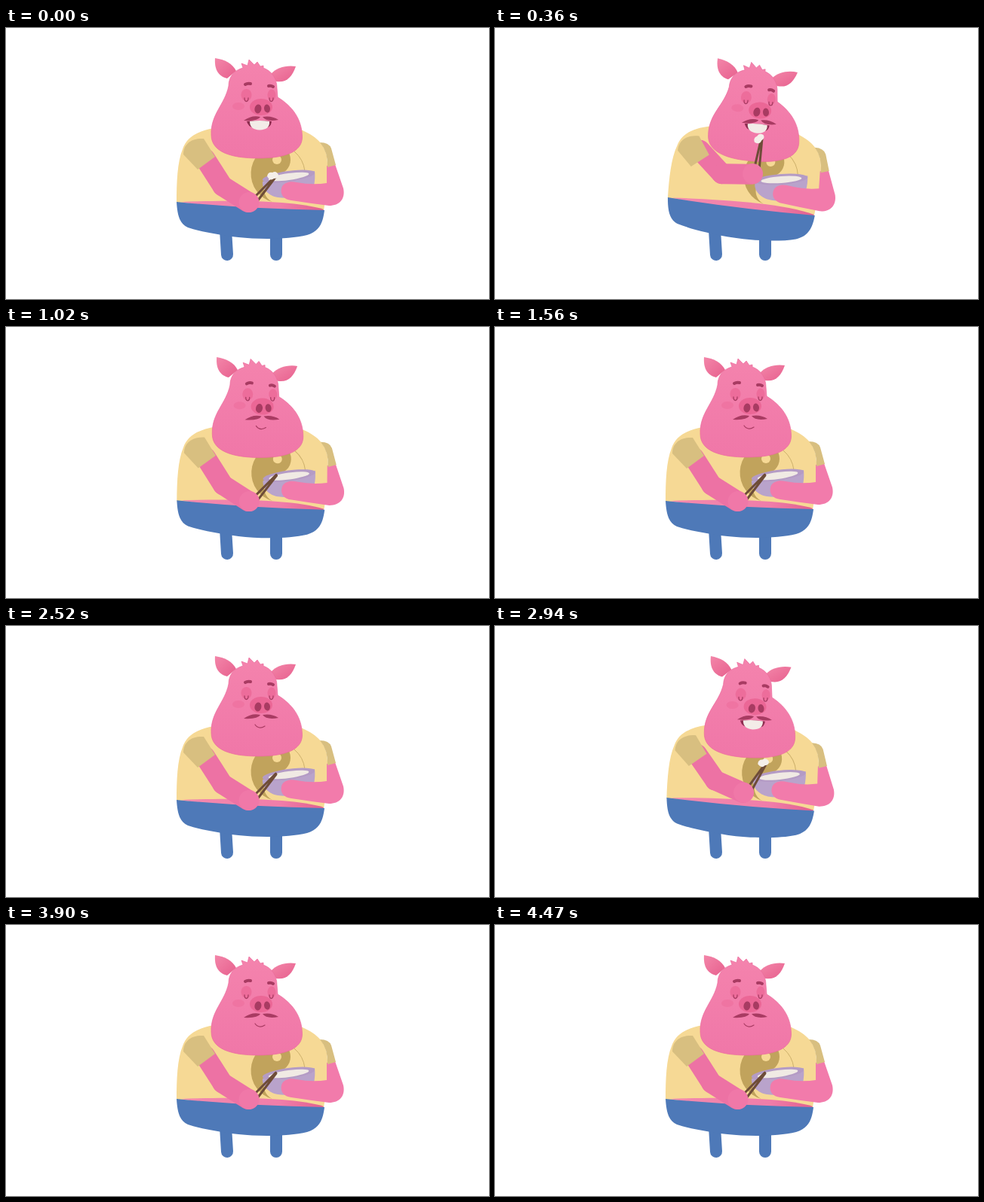
An HTML page for the animation above (4.5 s loop, 640 by 360 pixels).

```html
<!DOCTYPE html>
<html lang="en">
<head>
<meta charset="utf-8">
<title>Pig eating rice</title>
<style>
  html, body { margin: 0; width: 100%; height: 100%; overflow: hidden; background: #fff; }
  svg { display: block; width: 100vw; height: 100vh; }
  .line { fill: none; stroke-linecap: round; stroke-linejoin: round; }
</style>
</head>
<body>
<svg viewBox="0 0 640 360">
  <defs>
    <linearGradient id="skin" x1="0" y1="0" x2="0" y2="1">
      <stop offset="0" stop-color="#f483ad"/><stop offset="1" stop-color="#f077a8"/>
    </linearGradient>
    <linearGradient id="ear" x1="0" y1="0" x2="1" y2="1">
      <stop offset="0" stop-color="#f386a9"/><stop offset="1" stop-color="#e7608e"/>
    </linearGradient>
    <linearGradient id="belly">
      <stop offset="0" stop-color="#f38aae"/><stop offset=".7" stop-color="#f07da9"/><stop offset="1" stop-color="#e2608f"/>
    </linearGradient>
  </defs>

  <g class="line" stroke="#4e79b8" stroke-width="16">
    <path d="M291 268L293 301M358 268V301"/>
  </g>

  <g class="torso">
    <path fill="#f6d995" d="M226 232C226 205 227 178 234 161C239 145 254 137 275 133H385C407 141 421 151 425 170C428 190 425 220 421 242Z"/>
    <path fill="#c1a35c" d="M357 155A20 20 0 0 1 357 195A19 19 0 0 0 353 231A39 39 0 0 1 357 155Z"/>
    <path class="line" stroke="#cdb06b" d="M382 164A40 40 0 0 1 396 190"/>
    <circle cx="359" cy="175" r="6" fill="#f6d995"/>
    <path fill="url(#belly)" d="M232 231C290 229 380 228 421 241L418 245L300 242Z"/>
    <path fill="#4e79b8" d="M226 231Q320 240 422 242C420 258 416 270 399 275C375 281 335 281 308 278C285 275 259 271 241 265C229 260 227 246 226 231Z"/>
    <path fill="#b9a3cb" d="M340 204C339 214 348 223 360 225C380 228 405 221 408 210Q410 199 409 190Z"/>
    <g transform="rotate(-8 374.5 197)">
      <ellipse cx="374.500" cy="197" rx="35" ry="7" fill="#b49bc5"/>
      <ellipse cx="374.500" cy="197.500" rx="27" ry="4.500" fill="#f0eae4"/>
    </g>
    <path fill="#f27bab" d="M425 183L436 181L447 213C450 227 442 236 428 236Q404 233 378 229C368 228 363 221 365 213C367 205 377 203 385 205Q406 209 425 206Z"/>
    <path fill="#d8bf80" d="M416 152Q428 152 431 160L437 182L426 185Q427 165 416 152Z"/>
  </g>

  <g id="head">
    <path fill="url(#ear)" d="M277 40C290 42 300 47 305 57L293 67C280 64 276 53 277 40Z"/>
    <path fill="url(#ear)" d="M384 51C371 49 358 53 351 61L358 71C372 73 379 65 384 51Z"/>
    <path fill="url(#skin)" stroke="#eb6c9d" stroke-width=".7" d="M295 77C295 64 303 56 314 53L312 47L320 50L322 42L329 49L333 45L337 51L341 50L341 53C352 57 359 67 359 80L360 92C380 104 392.500 122 392.500 145C392.500 165 369 173 334 173C299 173 272 165 272 142C271 114 290 102 295 77Z"/>
    <g fill="#eb6796">
      <ellipse cx="308" cy="104" rx="8" ry="5" opacity=".4"/>
      <ellipse cx="318.500" cy="89" rx="7" ry="8" opacity=".75"/>
      <ellipse cx="352" cy="89" rx="5.500" ry="7.500" opacity=".75"/>
      <ellipse cx="338" cy="105" rx="15" ry="11"/>
    </g>
    <g fill="#a83b62">
      <ellipse cx="334" cy="107.500" rx="4.500" ry="6" transform="rotate(10 334 107)"/>
      <ellipse cx="346" cy="107" rx="4" ry="5.500" transform="rotate(-10 346 107)"/>
      <path d="M315 123Q326 115 337 118Q334 124 315 123ZM340 118Q352 116 361 122Q345 125 340 118Z"/>
    </g>
    <g class="line" stroke="#a83b62">
      <path stroke-width="4" d="M317 75Q320 73 324 74M348 77Q351 76 354 78"/>
      <path stroke-width="1.300" d="M316 93C316 99 321 99 321 93M349 93C349 99 354 99 354 93"/>
      <path id="smile" stroke-width="1.200" d="M330 131Q335 138 343 133"/>
    </g>
    <g id="grin">
      <path fill="#8e2d50" d="M319 124Q336 122 352 124Q351 132 345 132H327Q321 131 319 124Z"/>
      <path fill="#f3ece8" d="M323 124Q336 122 349 124Q350 135 336 135.500Q323 135 323 124Z"/>
    </g>
  </g>

  <g class="torso">
    <g id="upper">
      <path class="line" stroke="#ed72a4" stroke-width="27" d="M264 174L287 210"/>
      <g id="fore">
        <path class="line" stroke="#6e4c38" stroke-width="3" d="M325 229L357.500 196M330 234L358 197"/>
        <path id="bite" fill="#f5efea" d="M346 197Q347 191 353 192Q358 189 361 195Q361 200 355 200Q350 204 346 197Z"/>
        <path class="line" stroke="#ed72a4" stroke-width="27" d="M287 210L321 231.500"/>
        <circle cx="322" cy="231.500" r="13.500" fill="#f078a8"/>
      </g>
    </g>
    <path fill="#d8bf80" d="M235 168C235 152 249 146 262 147L277 171L254 188Z"/>
  </g>
</svg>
<script>
  const LOOP = 4500, SECOND_BITE = 2730;
  const $ = id => document.getElementById(id);
  const torso = document.querySelectorAll('.torso');
  const ease = (t, from, to) => {
    const u = Math.min(1, Math.max(0, (t - from) / (to - from)));
    return u * u * (3 - 2 * u);
  };
  const pose = (el, value) => el.setAttribute('transform', value);
  const show = (el, on) => el.setAttribute('visibility', on ? 'visible' : 'hidden');

  function draw(now) {
    const time = now % LOOP;
    const t = time < SECOND_BITE ? time : time - SECOND_BITE;
    const lean = ease(t, 30, 400) - ease(t, 770, 1090);
    const lift = ease(t, 100, 440) - ease(t, 583, 790);
    const eating = t < 540;

    for (const part of torso)
      pose(part, `translate(${2.5 * lean} ${0.5 * lean}) rotate(${3.9 * lean} 323.5 236)`);
    pose($('head'), `translate(${8.5 * lean} ${4 * lean}) rotate(${4.3 * lean} 333 173)`);
    pose($('upper'), `translate(${-2 * lift} ${-9 * lift}) rotate(${-16 * lift} 262 165)`);
    pose($('fore'), `rotate(${-25 * lift} 287 210)`);
    show($('grin'), eating);
    show($('smile'), !eating);
    show($('bite'), eating);
  }

  const start = performance.now();
  function frame() {
    draw(performance.now() - start);
    requestAnimationFrame(frame);
  }
  frame();
</script>
</body>
</html>
```
